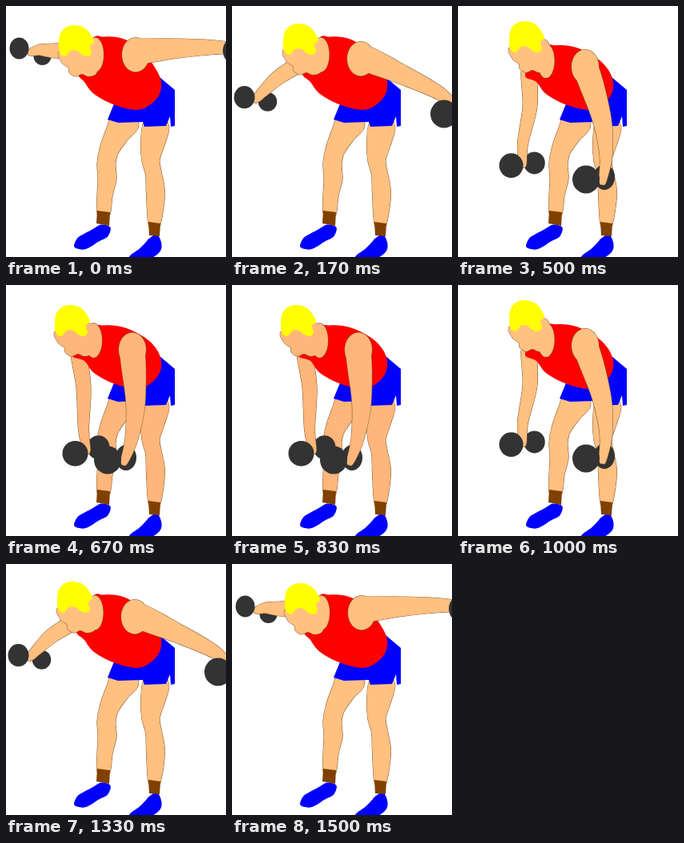
An HTML page with a canvas that plays this animation: 275 px wide and 314 px high, repeating every 1.58 s.

```html
<!DOCTYPE html>
<html lang="en">
<head>
<meta charset="utf-8">
<title>Bent-over raise</title>
<style>
html, body { margin: 0; width: 100%; height: 100%; overflow: hidden; background: #fff; }
canvas { display: block; width: 275px; height: 314px; }
</style>
</head>
<body>
<canvas id="stage" width="275" height="314"></canvas>
<script>
const ctx = document.getElementById('stage').getContext('2d');
const LOOP = 1580, STEP = 250 / 3, LAST = 18;
const LINE = '#80582f', BLUE = '#0000ff', RED = '#ff0000', YELLOW = '#ffff00', SOCK = '#804000', IRON = '#333';

// Joints from arms raised to arms hanging.
// near: elbow, wrist, fingers; far: shoulder, elbow, wrist, fingers; head: offset.
const POSES = [
  { near: [[215, 53], [270, 52], [309, 58]], far: [[80, 55], [60, 56], [41, 55], [31, 58]], head: [[2, 6]] },
  { near: [[213, 86], [262, 111], [286, 137]], far: [[84, 73], [57, 90], [38, 108], [30, 117]], head: [[0, 4]] },
  { near: [[201, 120], [228, 168], [232, 195]], far: [[86, 84], [69, 122], [53, 154], [50, 167]], head: [[0, 0]] },
  { near: [[179, 138], [185, 185], [181, 219]], far: [[88, 82], [90, 125], [81, 172], [81, 198]], head: [[0, 1]] },
  { near: [[162, 146], [157, 192], [148, 221]], far: [[90, 84], [97, 128], [97, 180], [101, 207]], head: [[-3, 7]] }
];

// Limbs are chains of x, y, half width.
const LEGS = [
  [[150, 142, 18], [139, 160, 15], [129, 180, 12], [125.5, 197, 11.5], [126.5, 216, 11.5], [123.5, 237, 9.5], [122, 260, 8]],
  [[188, 148, 16], [183, 174, 14.5], [181, 194, 11], [184.5, 210, 10], [187, 235, 11.5], [185.5, 273, 7.5]]
];
const SHOES = [
  [[123, 281, 8.5], [112, 287, 8.5], [100, 294, 9], [92, 298, 7.5]],
  [[186, 294, 8.5], [184, 301, 10.5], [172, 311, 9], [158, 319, 7]]
];
const SOCKS = [
  [[114, 256], [130, 258], [129, 275], [113, 272]],
  [[178, 270], [193, 272], [192, 288], [179, 287]]
];
const SHORTS = [[136, 120], [127, 142], [140, 146], [171, 145], [173, 151], [200, 150], [205, 138],
  [206, 151], [211, 150], [211, 105], [192, 89], [165, 100]];
const FACE = [[66, 50], [68, 65], [76, 71], [77, 77], [85, 82], [93, 79], [101, 82], [111, 78], [114, 60], [108, 41]];
const HAIR = [[64, 40], [66, 28], [74, 20], [85, 18], [97, 22], [104, 30], [108, 39], [103, 44],
  [105, 52], [101, 57], [93, 55], [87, 50], [79, 50], [72, 57], [65, 52]];

const smooth = u => (u = Math.max(0, Math.min(1, u)), u * u * (3 - 2 * u));
const shift = (pts, [dx, dy]) => pts.map(([x, y]) => [x + dx, y + dy]);

// Catmull-Rom blend of one part's joints at position k in POSES.
function joints(part, k) {
  const i = Math.min(Math.floor(k), POSES.length - 2), u = k - i;
  return POSES[i][part].map((p, n) => p.map((b, axis) => {
    const value = j => POSES[j] && POSES[j][part][n][axis];
    const c = value(i + 1), a = value(i - 1) ?? 2 * b - c, d = value(i + 2) ?? 2 * c - b;
    return b + u / 2 * (c - a + u * (2 * a - 5 * b + 4 * c - d + u * (3 * (b - c) + d - a)));
  }));
}

// Closed smooth curve through the points.
function blob(pts) {
  const path = new Path2D(), at = i => pts[(i + pts.length) % pts.length];
  path.moveTo(...pts[0]);
  pts.forEach((b, i) => {
    const a = at(i - 1), c = at(i + 1), d = at(i + 2);
    path.bezierCurveTo(b[0] + (c[0] - a[0]) / 6, b[1] + (c[1] - a[1]) / 6,
      c[0] - (d[0] - b[0]) / 6, c[1] - (d[1] - b[1]) / 6, ...c);
  });
  return path;
}

// Outline of a tapered limb with rounded ends.
function limb(nodes) {
  const left = [], right = [], end = nodes.length - 1;
  let start, tip;
  nodes.forEach(([x, y, half], i) => {
    const [px, py] = nodes[Math.max(i - 1, 0)], [nx, ny] = nodes[Math.min(i + 1, end)];
    const scale = half / Math.hypot(nx - px, ny - py);
    const tx = (nx - px) * scale, ty = (ny - py) * scale;
    left.push([x + ty, y - tx]);
    right.unshift([x - ty, y + tx]);
    if (i === 0) start = [x - tx, y - ty];
    if (i === end) tip = [x + tx, y + ty];
  });
  return blob([start, ...left, tip, ...right]);
}

function polygon(pts) {
  return new Path2D('M' + pts.join('L') + 'Z');
}

function oval(x, y, rx, ry) {
  const path = new Path2D();
  path.ellipse(x, y, rx, ry, 0, 0, 2 * Math.PI);
  return path;
}

// Stroking before filling merges overlapping paths into one outlined shape.
function paint(color, paths, outlined) {
  ctx.fillStyle = color;
  if (outlined) paths.forEach(p => ctx.stroke(p));
  paths.forEach(p => ctx.fill(p));
}

function arm(points, widths) {
  return limb(points.map((p, i) => [...p, widths[i]]));
}

function draw(step) {
  const k = Math.min(step / 2, 4.3);
  const skin = step > 7 ? '#ffb67a' : '#ffc080';
  const drop = 12 * smooth((k - 1) / 2.5);
  const far = joints('far', k), near = joints('near', k), [head] = joints('head', k);
  const [fx, fy] = far[3], [nx, ny] = near[2], tilt = 2.2 * k - 5;

  ctx.fillStyle = '#fff';
  ctx.fillRect(0, 0, 275, 314);
  ctx.strokeStyle = LINE;
  ctx.lineWidth = 1.1;

  paint(skin, LEGS.map(limb), true);
  paint(BLUE, SHOES.map(limb));
  paint(SOCK, SOCKS.map(polygon));
  paint(BLUE, [polygon(SHORTS)]);

  paint(IRON, [oval(fx + 14.5, fy - tilt, 11 + 0.75 * k, 11 + k)]);
  paint(skin, [arm(far, [9, 9, 6.5, 4.5])], true);
  paint(IRON, [oval(fx - 14.5, fy + tilt, 12 + k, 13.5 + 0.6 * k)]);

  paint(RED, [blob([[108, 41 + drop], [122, 38.5 + drop], [138, 39 + drop], [155, 45 + drop * 0.9],
    [175, 62 + drop * 0.4], [188, 80], [194, 95], [192, 110], [181, 123], [163, 130],
    [134, 123], [110, 110], [98, 95], [90 - 2 * k, 81 + drop * 0.4]])]);
  paint(skin, [oval(111.5 - k / 2, 61 + drop * 0.7, 10.5, 21.5), blob(shift(FACE, head))], true);
  paint(YELLOW, [blob(shift(HAIR, head))]);

  paint(IRON, [oval(nx + 2, ny - 5, 13, 16)]);
  paint(skin, [
    oval(162 - k, 61 + 5 * k, 17, 21.5),
    arm([[163 - 1.3 * k, 57 + 6 * k], ...near], [15, 12, 8, 4.5])
  ], true);
  paint(IRON, [oval(nx - 21, ny - 2, 17, 17.5)]);
}

function frame(now) {
  const t = now % LOOP;
  let n = Math.min(Math.round(t / STEP), LAST);
  if (Math.round(n * STEP / 10) * 10 > t) n--;
  draw(Math.min(n, LAST - n));
  requestAnimationFrame(frame);
}
requestAnimationFrame(frame);
</script>
</body>
</html>
```
